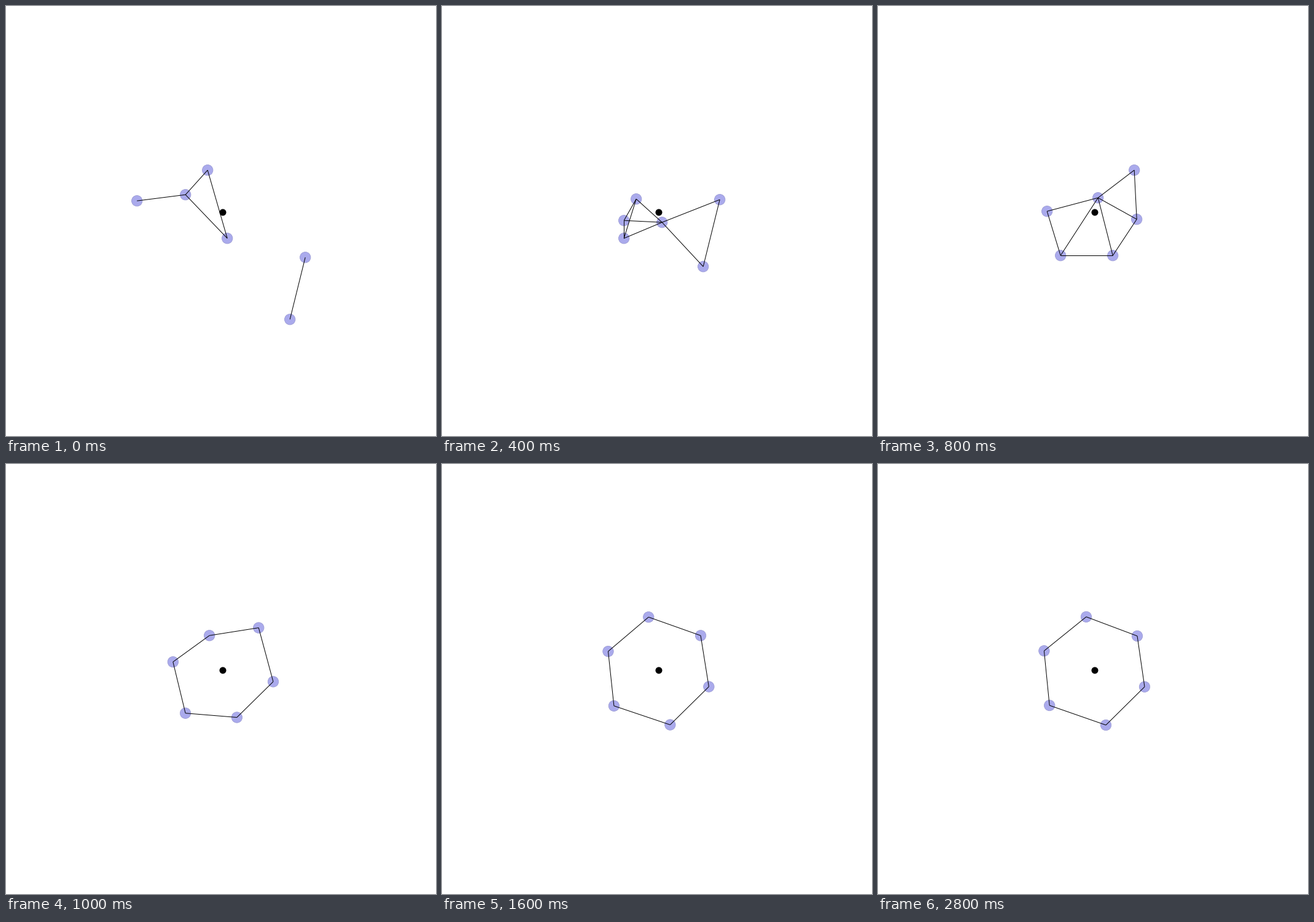
These frames come from a looping animation (700 by 700 pixels, 5000 ms). A matplotlib script:

```python
import numpy as np
import matplotlib.pyplot as plt
from itertools import combinations
from matplotlib.animation import FuncAnimation
from matplotlib.collections import LineCollection
from matplotlib.patches import Circle

SIZE, DPI = 700, 100
STEP_MS, STEPS = 100, 50
LINK_RANGE = 120          # agents closer than this are linked
GOAL = (353, 336)
LEG = 4                   # steps between two poses
SETTLE = 0.53             # decay rate per step towards the ring
PX = 72 / DPI

# Key poses of the six agents: scattered, gathering, spreading, loose ring.
POSES = np.array([
    [(213, 317), (292, 307), (328, 267), (360, 378), (487, 409), (462, 510)],
    [(296, 378), (296, 349), (316, 314), (358, 352), (452, 315), (425, 424)],
    [(297, 406), (275, 334), (358, 312), (421, 347), (417, 267), (382, 406)],
    [(285, 399), (271, 311), (316, 252), (437, 361), (414, 274), (374, 421)],
]) + 0.2
RING = np.array([(279.2, 393), (270.4, 304.2), (339, 248.8),
                 (434, 362.7), (422, 280), (371, 425)])

# Velocity per leg at each pose, matched to the final decay.
PULL = SETTLE * LEG * (RING - POSES[-1])
VELOCITY = np.concatenate([POSES[1:2] - POSES[:1], (POSES[2:] - POSES[:-2]) / 2, [PULL]])


def agent_positions(step):
    leg, u = divmod(step / LEG, 1)
    leg, last = int(leg), len(POSES) - 1
    if leg >= last:
        return RING + (POSES[-1] - RING) * np.exp(-SETTLE * (step - last * LEG))
    start, end = POSES[leg:leg + 2]
    v0, v1 = VELOCITY[leg:leg + 2]
    return (start + (end - start) * u * u * (3 - 2 * u)
            + v0 * u * (1 - u) ** 2 - v1 * u * u * (1 - u))


fig = plt.figure(figsize=(SIZE / DPI, SIZE / DPI), dpi=DPI, facecolor="white")
ax = fig.add_axes([0, 0, 1, 1])
ax.set(xlim=(0, SIZE), ylim=(SIZE, 0))
ax.axis("off")

agents = [ax.add_patch(Circle(spot, 8.7, facecolor="#aaaaec", edgecolor="#9b9bd4",
                              linewidth=0.8 * PX, zorder=1)) for spot in RING]
links = ax.add_collection(LineCollection([], colors="black", linewidths=PX, zorder=2))
ax.add_patch(Circle(GOAL, 5.5, color="black", linewidth=0, zorder=3))


def draw(step):
    points = agent_positions(step)
    for agent, point in zip(agents, points):
        agent.center = point
    links.set_segments([(p, q) for p, q in combinations(points, 2)
                        if np.hypot(*(p - q)) < LINK_RANGE])
    return [*agents, links]


anim = FuncAnimation(fig, draw, frames=STEPS, interval=STEP_MS, repeat=True, repeat_delay=0)
plt.show()
```
